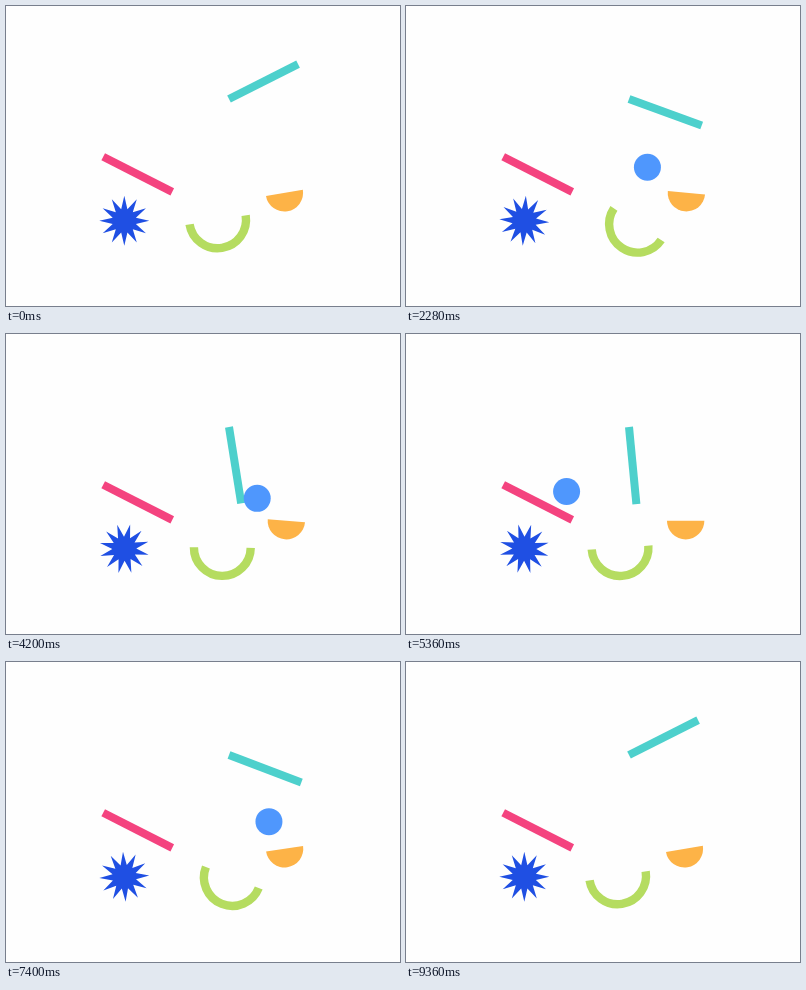
Animation, 394 px wide and 300 px high, one loop 9560 ms. Source, as an HTML page with a canvas:

```html
<!DOCTYPE html>
<html lang="en">
<head>
<meta charset="utf-8">
<title>Bouncing ball</title>
<style>
  html, body { margin: 0; width: 100%; height: 100%; overflow: hidden; background: #fefefe; }
  canvas { display: block; }
</style>
</head>
<body>
<canvas id="stage" width="394" height="300"></canvas>
<script>
const ctx = document.getElementById('stage').getContext('2d');
const LOOP = 9560, LAST = 9360, STEP = 40, GRAVITY = 715;
const RAD = Math.PI / 180;

// Height of the ball's centre when it touches each surface
const entry = () => 30.6;
const bar = x => 145 + 0.507 * (x - 117);
const bowl = () => 212;
const rim = () => 212;
const cup = () => 170;

// Bounces: seconds, x, surface
const route = [
  [0.73, 29, entry], [1.29, 116, bar], [1.96, 210, bowl], [2.51, 264, cup],
  [3.17, 118, bar], [3.79, 193, rim], [4.29, 264, cup], [4.91, 135, bar],
  [5.42, 164, bar], [5.9, 215, bowl], [6.82, 274, cup], [7.45, 262, cup],
  [8.165, 241, bowl], [8.92, 364, cup]
];
const hitsOn = surface => route.filter(stop => stop[2] === surface).map(stop => stop[0]);
const starHit = 3.17;

// Free flight under gravity between two bounces
function ballAt(t) {
  const i = route.findIndex(stop => stop[0] > t);
  if (i < 1) return null;
  const [t0, x0, from] = route[i - 1], [t1, x1, to] = route[i];
  const u = (t - t0) / (t1 - t0), y0 = from(x0), y1 = to(x1);
  return [x0 + (x1 - x0) * u, y0 + (y1 - y0) * u - GRAVITY / 2 * (t - t0) * (t1 - t)];
}

// Each knock sends the angle towards a goal: seconds, goal, rate
function settle(t, angle, knocks) {
  knocks.forEach(([time, goal, rate], i) => {
    const until = i + 1 < knocks.length ? Math.min(t, knocks[i + 1][0]) : t;
    angle = goal + (angle - goal) * Math.exp(-rate * Math.max(0, until - time));
  });
  return angle;
}

// Short push after each hit
function dip(t, hits, depth, length) {
  const since = hits.map(hit => t - hit).find(s => s > 0 && s < length) || 0;
  return depth * Math.sin(Math.PI * since / length);
}

// The hand falls like a damped pendulum, then gets knocked up twice
function handAngle(t) {
  const fall = 113 / (1 + Math.exp(-1.87 * (Math.min(t, 6) - 2.44))) - 28;
  return settle(t, fall, [[6, -95, 9], [6.4, 44.8, 1.73], [8.17, -27.5, 3.8]]);
}

const bowlAngle = t =>
  settle(t, -9, [[1.88, 38, 6], [2.85, -5, 1.5], [5.86, 19, 8], [7.3, 29.2, 3], [8.3, -9, 8]]);

const starAngle = t =>
  settle(t, 0, [[0, 4, 1], [3.8, 16, 4], [5.9, 27, 5], [7.4, 19.5, 5], [8.2, 30, 6]]);

const cupAngle = t =>
  -1.25 - 8.25 * Math.cos(2 * Math.PI * Math.min(1, t / 8.4) ** 0.7);

function placed(x, y, degrees, color, draw) {
  ctx.save();
  ctx.translate(x, y);
  ctx.rotate(degrees * RAD);
  ctx.fillStyle = ctx.strokeStyle = color;
  ctx.beginPath();
  draw();
  ctx.restore();
}

const stick = () => ctx.fillRect(0, -4, 77.4, 8);

function disc(y, radius, turn) {
  ctx.arc(0, y, radius, 0, turn);
  ctx.fill();
}

function star() {
  for (let i = 0; i < 24; i++) {
    const r = i % 2 ? 12 : 25, a = i * 15 * RAD;
    ctx.lineTo(r * Math.sin(a), -r * Math.cos(a));
  }
  ctx.fill();
}

function halfRing() {
  ctx.lineWidth = 8.4;
  ctx.arc(0, -28, 28.4, 0, Math.PI);
  ctx.stroke();
}

function render(t) {
  ctx.fillStyle = '#fefefe';
  ctx.fillRect(0, 0, 394, 300);
  ctx.save();
  ctx.beginPath();
  ctx.rect(47, 0, 300, 300);
  ctx.clip();

  const barDip = dip(t, hitsOn(bar), 7.6, 0.15);
  const starDip = dip(t, [starHit], 5, 0.15);
  const bowlDip = dip(t, hitsOn(bowl).map(hit => hit - 0.1), 12, 0.3);

  placed(97.2, 150.8 + barDip, 26.9, '#f4437f', stick);
  placed(223, 93, handAngle(t), '#4dd0cc', stick);
  placed(118.3, 214.8 + starDip, starAngle(t), '#1f4fe3', star);
  placed(216, 241.5 + bowlDip, bowlAngle(t), '#b5dc60', halfRing);
  placed(279.7, 194.5, cupAngle(t), '#fdb347', () => disc(-7.8, 18.7, Math.PI));

  const ball = ballAt(t);
  if (ball) placed(...ball, 0, '#4f97fd', () => disc(0, 13.5, 2 * Math.PI));
  ctx.restore();
}

const start = performance.now();
function tick() {
  const ms = (performance.now() - start) % LOOP;
  render(Math.min(LAST, Math.floor(ms / STEP) * STEP) / 1000);
  requestAnimationFrame(tick);
}
tick();
</script>
</body>
</html>
```
